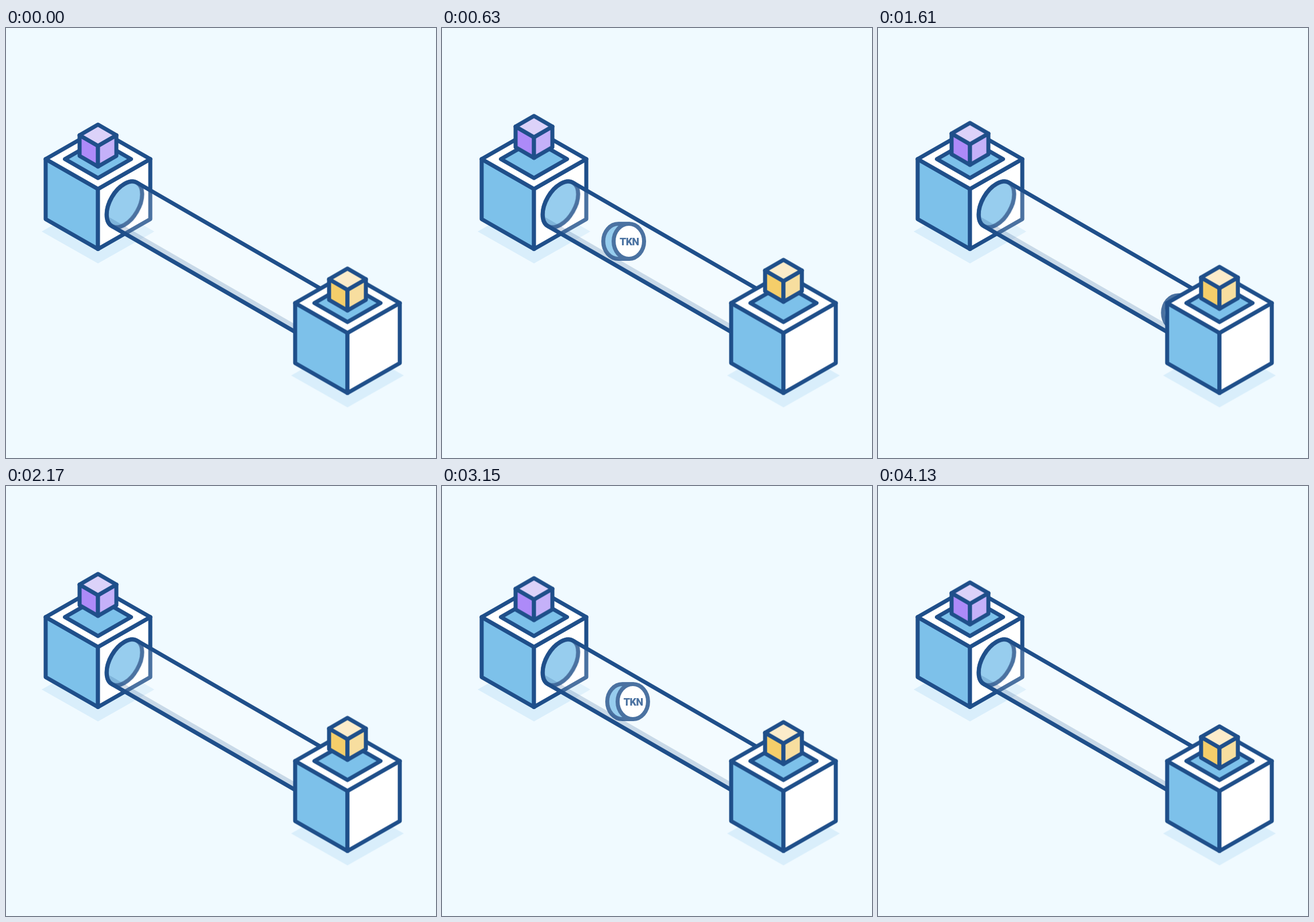
Write an HTML page that moves like this. It is 748 by 748 pixels and loops after 4200 ms.

```html
<!DOCTYPE html>
<html lang="en">
<head>
<meta charset="utf-8">
<title>Token transfer</title>
<style>
  html, body { margin: 0; width: 100%; height: 100%; overflow: hidden; background: #f0faff; }
  svg { display: block; width: 100vw; height: 100vh; }
  .line { stroke: #1f4f8a; stroke-width: 7; stroke-linejoin: round; stroke-linecap: round; }
  text { font: 900 18px Roboto, Inter, sans-serif; letter-spacing: -.6px; fill: #1f4f8a; text-anchor: middle; }
</style>
</head>
<body>
<svg viewBox="0 0 748 748">
  <defs>
    <clipPath id="inside"><path class="tube"/></clipPath>
  </defs>

  <g id="left"></g>

  <ellipse class="line" cx="206" cy="306.8" rx="43.6" ry="25.2" transform="rotate(-60 206 306.8)" fill="#7dc1ea"/>

  <g clip-path="url(#inside)">
    <g id="coin">
      <path class="line" fill="#7dc1ea" d="M9 -30.5H-9A26.5 30.5 0 0 0 -9 30.5H9Z"/>
      <ellipse class="line" cx="9" rx="26.5" ry="30.5" fill="#fff"/>
      <text x="9.7" y="6.5">TKN</text>
    </g>
  </g>

  <path class="tube" fill="#fff" opacity=".2"/>
  <path d="M150 312L530 531V560L150 341Z" fill="#1f4f8a" opacity=".2" clip-path="url(#inside)"/>
  <path class="tube line" fill="none"/>

  <g id="right" transform="translate(434 250.4)"></g>
</svg>
<script>
  const LOOP = 4200, BOB = 1400;

  // Isometric cube: centre x, y of the side corners, half width, half depth, height
  const face = (d, fill) => `<path class="line" d="${d}" fill="${fill}"/>`;
  const diamond = (x, y, w, h) => `M${x - w} ${y}l${w} ${-h}l${w} ${h}l${-w} ${h}Z`;
  const cube = (x, y, w, h, tall, [left, right, top]) =>
    face(`M${x - w} ${y}l${w} ${h}v${tall}l${-w} ${-h}Z`, left) +
    face(`M${x + w} ${y}l${-w} ${h}v${tall}l${w} ${-h}Z`, right) +
    face(diamond(x, y, w, h), top);

  const station = colors =>
    `<path d="${diamond(160, 354, 98, 55.5)}" fill="#d9eefb"/>` +
    cube(160, 228, 91, 52, 104.5, ['#7dc1ea', '#fff', '#fff']) +
    face(diamond(160, 228, 57.5, 33), '#7dc1ea') +
    `<g class="bob">${cube(160, 186.5, 32, 18.5, 36, colors)}</g>`;

  const byId = id => document.getElementById(id);
  byId('left').innerHTML = station(['#ad8af8', '#c5b1f9', '#dcd2f9']);
  byId('right').innerHTML = station(['#f5ce6a', '#f7de9f', '#fcecca']);

  const tube = 'M567.8 465.3L227.8 269A43.6 25.2 -60 0 0 184.2 344.6L524.2 540.9';
  document.querySelectorAll('.tube').forEach(p => p.setAttribute('d', tube));

  const shift = (x, y) => `translate(${x}px, ${y}px)`;

  document.querySelectorAll('.bob').forEach(g => g.animate(
    [0, -15.4, 0].map(y => ({ transform: shift(0, y), easing: 'ease-in-out' })),
    { duration: BOB, iterations: Infinity }
  ));

  // Time in ms and share of the way between the two stations
  const trip = [
    [0, -.05], [630, .359], [1050, .578], [1610, .855], [1925, 1],
    [1990, 1], [2590, .679], [3150, .376], [3960, -.05], [LOOP, -.05]
  ];
  byId('coin').animate(
    trip.map(([t, p]) => ({ offset: t / LOOP, transform: shift(160 + 434 * p, 281 + 250.6 * p) })),
    { duration: LOOP, iterations: Infinity }
  );
</script>
</body>
</html>
```
